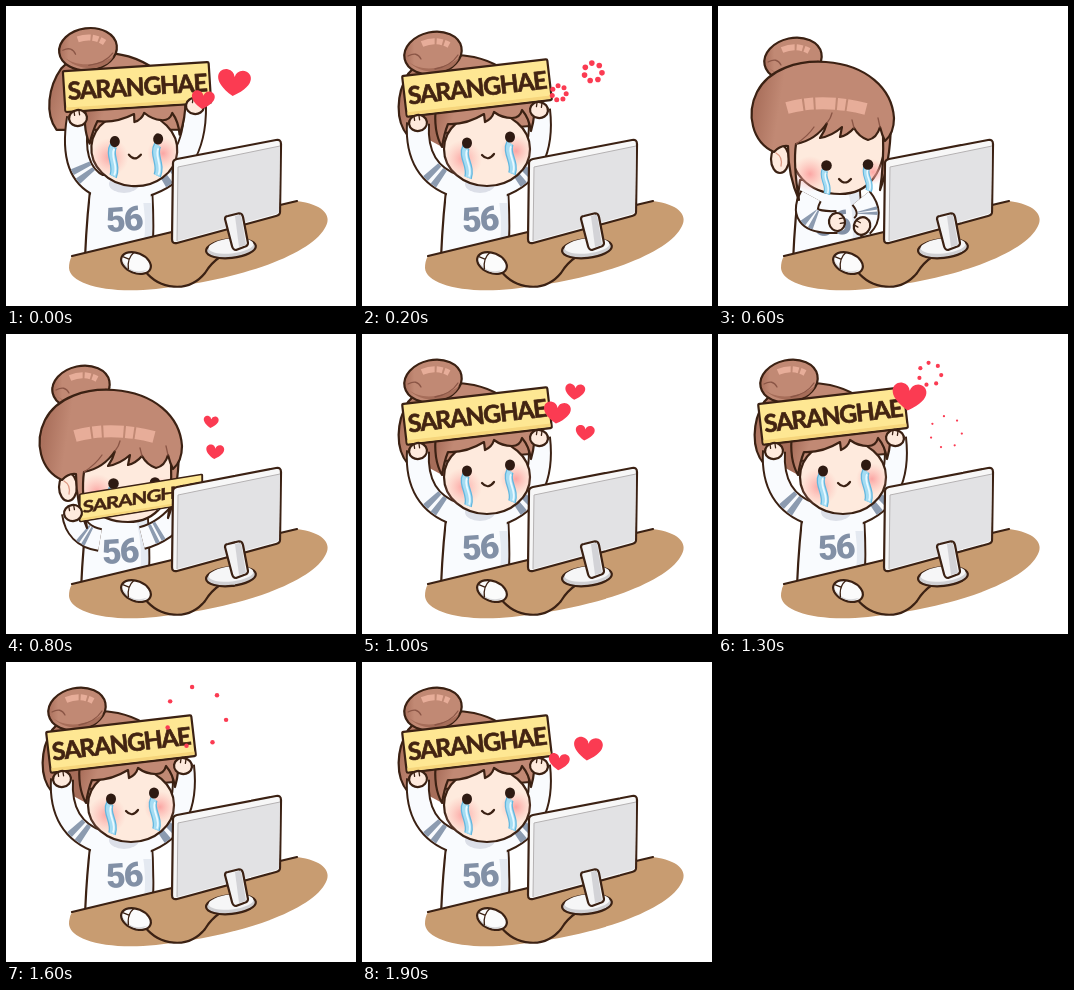
Write an HTML page that moves like this. It is 350 px wide and 300 px high and loops after 2000 ms.

```html
<!DOCTYPE html>
<html lang="en">
<head>
<meta charset="utf-8">
<title>Saranghae</title>
<style>
html, body { margin: 0; width: 100%; height: 100%; overflow: hidden; background: #fff; }
svg { display: block; width: 350px; height: 300px; }
.ink { stroke: #3b2113; stroke-width: 2.2; stroke-linejoin: round; stroke-linecap: round; }
.thin { stroke-width: 1.3; }
.line { fill: none; }
.hair { fill: url(#hair); }
.dark { fill: #a66d59; }
.shine { fill: none; stroke: #e7ad99; stroke-width: 6; }
.strand { fill: none; stroke: #8b5646; stroke-width: 1.3; stroke-linecap: round; }
.skin { fill: #feeadd; }
.cloth { fill: #f9fbfe; }
.eye { fill: #2e1a12; }
.tear path { fill: none; stroke: #62b7df; stroke-width: 8; }
.tear path + path { stroke: #a4dcf3; stroke-width: 5.5; }
.tear path + path + path { stroke: #e9f9ff; stroke-width: 1.8; }
.arm { fill: none; }
.num { font: 800 34px Roboto, Arial, sans-serif; letter-spacing: -2px; fill: #8290a6; text-anchor: middle; }
.word { font: 700 24.5px Lato, sans-serif; letter-spacing: -1.2px; fill: #432412; text-anchor: middle; }
.love { fill: #fb3b52; }
</style>
</head>
<body>
<svg viewBox="0 0 350 300">
  <defs>
    <linearGradient id="hair" y2=".15">
      <stop offset=".08" stop-color="#ab715d"/>
      <stop offset=".24" stop-color="#c18974"/>
    </linearGradient>
    <radialGradient id="blush">
      <stop offset="0" stop-color="#fb9a9a" stop-opacity=".85"/>
      <stop offset="1" stop-color="#fdb5ae" stop-opacity="0"/>
    </radialGradient>
    <g id="tear" class="tear">
      <path d="M0 0C-5 9 6 17 2 28"/><path d="M0 0C-5 9 6 17 2 28"/><path d="M1 3C-3 10 7 18 3 27"/>
    </g>
    <g id="bun">
      <ellipse class="ink hair" rx="29" ry="21" transform="rotate(-12)"/>
      <path class="dark" d="M-24 9C-12 19 10 17 26 5C21 20 -8 25 -24 9Z"/>
      <path class="shine" d="M-11 -9Q3 -15 16 -8" stroke-dasharray="13 2 6 2 9"/>
      <path class="strand" d="M-25 3Q-16 -2 -12 6M2 16Q18 13 25 2"/>
    </g>
  </defs>

  <g id="backHead">
    <path class="ink hair" d="M46 68C34 88 33 115 46 130L168 120C174 92 152 60 112 51C86 46 60 50 46 68Z"/>
    <path class="dark" d="M58 106L86 112L82 142L60 130Z"/>
    <use href="#bun" x="71" y="47"/>
  </g>

  <g id="body">
    <path class="ink cloth" d="M86 170Q81 205 79 252L147 236Q148 205 145 170Z"/>
    <path d="M135 185Q141 210 138 238L146 236Q147 210 145 180Z" fill="#e4e9f1"/>
    <text class="num" x="117.500" y="225" transform="rotate(-4 119 212)">56</text>
  </g>
  <g id="arms"></g>
  <g id="yoke">
    <path class="cloth" d="M87 170L144 170L145 197L84 197Z"/>
    <ellipse cx="118" cy="178" rx="15" ry="9" fill="#dcdfe8"/>
  </g>

  <g id="upFace">
    <ellipse class="ink skin" cx="125" cy="143" rx="43" ry="37"/>
    <circle cx="101" cy="153" r="19" fill="url(#blush)"/>
    <circle cx="154" cy="145" r="16" fill="url(#blush)"/>
    <use href="#tear" transform="translate(104 141) scale(1 1.1)"/>
    <use href="#tear" transform="translate(148 137) scale(1 1.1)"/>
    <ellipse class="eye" cx="105" cy="137" rx="5" ry="5.6"/>
    <ellipse class="eye" cx="148" cy="131" rx="5" ry="5.6"/>
    <path class="ink line" d="M120 149Q126 156 132 148"/>
    <path class="ink hair" d="M74 100L172 90Q174 108 169 125Q167 112 160 104Q158 112 150 112Q140 112 132 106Q130 113 123 116L122 108Q104 119 86 118Q82 128 80 141Q71 125 74 100Z"/>
  </g>

  <g id="downHead">
    <use href="#bun" x="75" y="53"/>
    <ellipse class="ink skin" cx="62" cy="153" rx="9" ry="14"/>
    <path class="strand" d="M58 147Q65 151 63 160" style="stroke:#dd9a85"/>
    <path class="ink skin" d="M72 128C68 168 92 188 122 188C150 188 168 168 168 122L120 96Z"/>
    <g id="features">
      <circle cx="92" cy="168" r="18" fill="url(#blush)"/>
      <circle cx="155" cy="166" r="13" fill="url(#blush)"/>
      <use href="#tear" transform="translate(107 164) scale(.85)"/>
      <use href="#tear" transform="translate(149 161) scale(.85)"/>
      <circle class="eye" cx="108.500" cy="159.500" r="5.3"/>
      <circle class="eye" cx="150" cy="158.500" r="5.3"/>
      <path class="ink line" d="M121 173Q127 180 133 173"/>
    </g>
    <path class="ink hair" d="M173 118Q172 158 162 184Q166 158 165 128Z"/>
    <path class="ink hair" d="M56 146C34 136 28 108 39 86C51 63 80 54 108 56C148 59 174 82 176 112C176 122 173 130 167 135Q164 129 162 121Q159 132 150 134Q141 131 136 122Q130 129 122 131L124 121Q114 130 102 132Q107 125 109 117Q98 134 78 138Q75 158 81 194Q70 170 70 140Q62 139 56 146Z"/>
    <path class="strand" d="M109 117Q113 112 114 107M136 122L134 114M162 121L160 112M78 138Q90 130 96 121"/>
    <path class="shine" style="stroke-width:12" d="M69 102Q105 92 148 103" stroke-dasharray="16 2 9 2 20 2 8 2 20"/>
  </g>

  <g id="sign">
    <rect class="ink" x="-73" y="-20.500" width="146" height="41" rx="1.500" fill="#fee793"/>
    <path d="M-72 17.500H72" stroke="#f6d57b" stroke-width="3"/>
    <text class="word" y="8.500" stroke="#432412" stroke-width=".7" stroke-linejoin="round">SARANGHAE</text>
  </g>
  <g id="hands"></g>

  <path fill="#c89c71" d="M66 250L291 195C316 198 326 209 320 220C307 248 235 274 150 283C100 288 64 278 63 262Q63 255 66 250Z"/>
  <path class="ink line" d="M66 250L170 225M274 199L291 195"/>
  <path class="ink line" d="M139 265C153 283 182 288 199 267Q205 257 214 251"/>
  <g transform="rotate(22 130 257)">
    <ellipse class="ink" cx="130" cy="257" rx="15.500" ry="10" fill="#fbfbfb"/>
    <path d="M117 260Q130 270 143 259Q139 266 130 266Q121 266 117 260Z" fill="#d8d8da"/>
    <path class="ink line thin" d="M124 248Q120 256 125 265M116 256H122"/>
  </g>

  <path class="ink" d="M167 157Q167 154 171 153L270 134Q275 133 275 138L274 206Q274 209 270 210L171 237Q166 238 166 233Z" fill="#f7f7f7"/>
  <path d="M172 161L274 140L273 207L171 235Z" fill="#e2e2e4"/>
  <path d="M172 161L274 140M172 161L171 235" fill="none" stroke="#b5b2b3"/>
  <ellipse class="ink" cx="225" cy="242.500" rx="25" ry="9.500" fill="#d0d0d3" transform="rotate(-6 225 243)"/>
  <ellipse cx="225" cy="240" rx="22.500" ry="7.500" fill="#f6f6f7" transform="rotate(-6 225 240)"/>
  <path class="ink" d="M219 213Q219 210 222 210L232 207.500Q236 207 237 211L242 237Q242 240 238 241L230 244Q227 244 226 240Z" fill="#f3f3f4"/>
  <path d="M229 210L235 208.500L240 239L233 241Z" fill="#d3d3d7"/>
  <g id="hearts" class="love"></g>
</svg>
<script>
const $ = id => document.getElementById(id);
const set = (el, attrs) => { for (const k in attrs) el.setAttribute(k, attrs[k]); return el; };
const make = (parent, tag, attrs) =>
  parent.appendChild(set(document.createElementNS('http://www.w3.org/2000/svg', tag), attrs));
const show = (id, on) => { $(id).style.display = on ? '' : 'none'; };

const LOOP = 2000;
const SWAY = 600;
const STEPS = [0, 100, 200, 300, 400, 500, 600, 800, 850, 900, 1000, 1100, 1200,
  1300, 1400, 1500, 1600, 1700, 1800, 1900];
const HEART = 'M0 .43C-.75 -.02 -.5 -.46 -.23 -.43Q-.04 -.4 0 -.2Q.04 -.4 .23 -.43C.5 -.46 .75 -.02 0 .43Z';

// keys: time, x, y, size; burst: start, end, x, y, final radius, dot size
const HEARTS = [
  { keys: [[800, 209, 118, 18], [1000, 195, 79, 27], [1300, 191, 63, 34]], burst: [1400, 1800, 190, 55, 38, 3.2] },
  { keys: [[800, 205, 88, 15], [1000, 213, 58, 20], [1100, 213, 48, 22]], burst: [1200, 1500, 212, 40, 16, 2.6] },
  { keys: [[850, 222, 111, 9], [1000, 223, 99, 19], [1100, 226, 97, 20]], burst: [1200, 1400, 228, 98, 20, 1.6] },
  { keys: [[1700, 196, 110, 10], [1900, 197, 100, 21], [2000, 197, 94, 23], [2100, 197, 89, 25]], burst: [2200, 2400, 197, 87, 24, 2.5] },
  { keys: [[1700, 222, 104, 14], [1900, 226, 87, 29], [2000, 228, 77, 33], [2100, 230, 69, 35]], burst: [2200, 2400, 231, 66, 30, 2.8] }
];

const arms = [0, 1].map(() => [
  make($('arms'), 'path', { class: 'arm', stroke: '#3b2113', 'stroke-width': 24 }),
  make($('arms'), 'path', { class: 'arm', stroke: '#f9fbfe', 'stroke-width': 20 }),
  make($('arms'), 'path', { class: 'arm', stroke: '#8c9bb0', 'stroke-width': 20, pathLength: 100 })
]);
const hands = [0, 1].map(() => {
  const g = make($('hands'), 'g', {});
  make(g, 'ellipse', { class: 'ink skin', rx: 9, ry: 8 });
  make(g, 'path', { class: 'ink line thin', d: 'M-3 -7v4M2 -7v4' });
  return g;
});

function reach(side, shoulder, elbow, hand, stripe, turn) {
  const d = `M${shoulder}Q${elbow} ${hand}`;
  arms[side].forEach(p => set(p, { d }));
  set(arms[side][2], { 'stroke-dasharray': `0 ${stripe} 7 4 7 200` });
  set(hands[side], { transform: `translate(${hand}) rotate(${turn})` });
}

function placeSign(x, y, angle, skew = 0, sx = 1, sy = 1) {
  set($('sign'), { transform: `translate(${x} ${y}) rotate(${angle}) skewX(${skew}) scale(${sx} ${sy})` });
}

function raised(s) {
  const turn = `rotate(${4.5 * s} 125 185)`;
  set($('backHead'), { transform: turn });
  set($('upFace'), { transform: turn });
  placeSign(115 + 16 * s, 82 - s, -6.6 + 3 * s);
  reach(0, [94, 180], [53 + 10 * s, 166], [56 + 16 * s, 117 - 5 * s], 20, -8);
  reach(1, [138, 180], [184 + 6 * s, 164], [177 + 12 * s, 104 - 4 * s], 18, 8);
}

function peeking(lift) {
  placeSign(135, 164 - lift, -9.2, -9, .85, .66 + lift / 90);
  reach(0, [94, 206], [70, 202], [67, 179 - lift], 28, -10);
  reach(1, [136, 204], [160, 198], [178, 174 - lift], 20, 10);
}

function fists(d) {
  reach(0, [93, 190], [78, 218], [119, 216 + d], 40, 80);
  reach(1, [143, 192], [156, 208], [144, 220 - d], 40, -60);
}

function pose(t) {
  const up = t <= 200 || t >= 900;
  const down = t >= 400 && t < 800;
  for (const id of ['backHead', 'upFace', 'yoke']) show(id, up);
  show('downHead', !up);
  show('sign', !down);
  set($('body'), { transform: up ? '' : 'translate(-4 4)' });
  set($('features'), { transform: down ? '' : 'translate(-1 -10)' });
  if (up) {
    const since = (t < 600 ? t + LOOP : t) - 1000;
    raised(-Math.sin(since / SWAY * 2 * Math.PI) / Math.sin(Math.PI / 3));
  } else if (down) fists(t === 500 ? 4 : 0);
  else peeking(t === 800 ? 0 : 16);
}

function heartAt(keys, t) {
  const i = keys.findIndex(k => k[0] >= t);
  if (i < 0) return keys[keys.length - 1].slice(1);
  const b = keys[i], a = keys[Math.max(i - 1, 0)];
  const p = i ? (t - a[0]) / (b[0] - a[0]) : 1;
  return [1, 2, 3].map(n => a[n] + (b[n] - a[n]) * p);
}

function drawHearts(t) {
  const box = $('hearts');
  box.replaceChildren();
  if (t < 600) t += LOOP;
  for (const { keys, burst } of HEARTS) {
    const [start, end, cx, cy, far, dot] = burst;
    if (t >= keys[0][0] && t < start) {
      const [x, y, size] = heartAt(keys, t);
      make(box, 'path', { d: HEART, transform: `translate(${x} ${y}) rotate(6) scale(${size} ${size * .92})` });
    } else if (t >= start && t < end) {
      const p = (t - start) / (end - start);
      const r = far * (.3 + .7 * Math.sqrt(p));
      for (let n = 0; n < 7; n++) {
        const a = n * Math.PI * 2 / 7 - 1.7;
        make(box, 'circle', { cx: cx + r * Math.cos(a), cy: cy + r * Math.sin(a), r: dot * (1 - .6 * p) });
      }
    }
  }
}

let last = -1;
function tick() {
  const now = performance.now() % LOOP;
  const t = STEPS.filter(s => s <= now).pop();
  if (t !== last) {
    last = t;
    pose(t);
    drawHearts(t);
  }
  requestAnimationFrame(tick);
}
tick();
</script>
</body>
</html>
```
